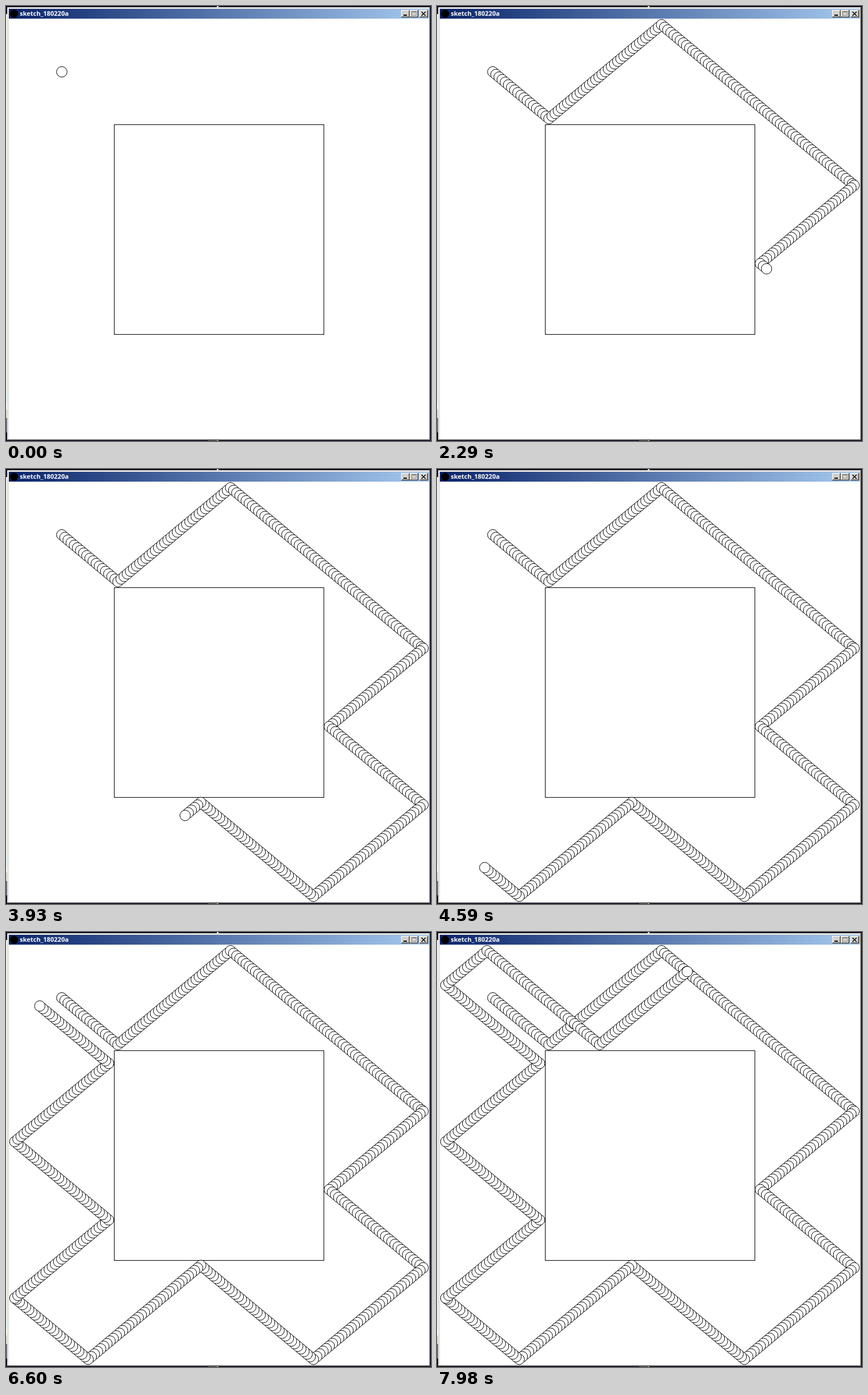
An HTML page with a canvas for the animation above (8000 ms loop, 740 by 757 pixels).

```html
<!DOCTYPE html>
<html lang="en">
<head>
<meta charset="utf-8">
<title>Bouncing ball</title>
<style>
html, body { margin: 0; width: 100%; height: 100%; overflow: hidden; background: #fff; }
canvas { display: block; }
</style>
</head>
<body>
<canvas id="stage" width="740" height="757"></canvas>
<script>
const ctx = document.getElementById('stage').getContext('2d');
const LOOP = 8000, RADIUS = 9.15;
const FACE = '#d4d0c8';

// Limits for the ball's centre, measured from the middle of the field
const MIDDLE = [370.8, 388.1], OUTER = 355.5, INNER = 192.1;
const GAP = OUTER - INNER;
const START = [97.2, 114.6];

// Nearest wall ahead: time in steps and the axis it blocks
function nextHit(pos, vel) {
  let hit = { time: Infinity, axis: 0 };
  for (const axis of [0, 1]) {
    const side = Math.sign(vel[axis]), other = 1 - axis;
    const outer = (side * OUTER - pos[axis]) / vel[axis];
    const inner = (-side * INNER - pos[axis]) / vel[axis];
    const across = Math.abs(pos[other] + vel[other] * inner);
    const time = inner > 0 && across < INNER ? inner : outer;
    if (time < hit.time) hit = { time, axis };
  }
  return hit;
}

// A step that would pass or nearly touch a wall ends on it
function simulate(count) {
  const pos = START.map((p, i) => p - MIDDLE[i]);
  const vel = [GAP / 30, GAP / 36];
  const balls = [START];
  while (balls.length < count) {
    const { time, axis } = nextHit(pos, vel);
    const bounces = time < 1.3;
    const dt = bounces ? time : 1;
    pos[0] += vel[0] * dt;
    pos[1] += vel[1] * dt;
    if (bounces) vel[axis] *= -1;
    balls.push([pos[0] + MIDDLE[0], pos[1] + MIDDLE[1]]);
  }
  return balls;
}

// The sketch slows a little as it runs
const ballCount = t => 1 + Math.floor(0.0652 * t - 2.5e-7 * t * t);
const balls = simulate(ballCount(LOOP));

function box(x, y, w, h, color) {
  ctx.fillStyle = color;
  ctx.fillRect(x, y, w, h);
}

function drawButton(x) {
  box(x, 7, 15, 13, '#404040');
  box(x, 7, 14, 12, '#fff');
  box(x + 1, 8, 13, 11, '#808080');
  box(x + 1, 8, 12, 10, FACE);
}

function drawButtons() {
  [688, 703, 720].forEach(drawButton);
  box(692, 15, 6, 2, '#000');
  // Disabled maximise
  box(707, 10, 9, 8, '#fff');
  box(706, 9, 9, 8, '#808080');
  box(707, 11, 7, 5, FACE);
  for (let i = 0; i < 7; i++) {
    box(723 + i, 10 + i, 2, 1, '#000');
    box(729 - i, 10 + i, 2, 1, '#000');
  }
}

function drawDesktop() {
  box(0, 0, 740, 757, '#080c1c');
  box(0, 14, 3, 658, '#f1f0e8');
  box(0, 672, 3, 18, '#dff6f4');
  box(0, 690, 3, 12, '#fbfbf6');
  box(0, 702, 3, 15, '#dcd9cc');
  box(0, 717, 3, 25, '#6c7280');
  box(367, 0, 3, 2, '#d8d8d8');
  box(352, 756, 15, 1, '#606060');
  box(367, 756, 3, 1, '#d8d8d8');
}

function drawWindow() {
  box(2, 2, 737, 754, '#404040');
  box(2, 2, 736, 753, FACE);
  box(3, 3, 735, 752, '#808080');
  box(3, 3, 734, 751, '#fff');
  box(4, 4, 733, 750, FACE);
  const bar = ctx.createLinearGradient(5, 0, 736, 0);
  bar.addColorStop(0, '#0a246a');
  bar.addColorStop(1, '#a6caf0');
  box(5, 5, 731, 17, bar);
  box(5, 22, 732, 732, '#fff');

  ctx.fillStyle = '#000';
  ctx.beginPath();
  ctx.arc(14, 13.5, 7, 0, Math.PI * 2);
  ctx.fill();
  ctx.fillStyle = '#fff';
  ctx.font = 'bold 11px "Open Sans", "Noto Sans", sans-serif';
  ctx.fillText('sketch_180220a', 24, 17);
  drawButtons();
}

function drawBall([x, y]) {
  ctx.beginPath();
  ctx.arc(x, y, RADIUS, 0, Math.PI * 2);
  ctx.fill();
  ctx.stroke();
}

function draw(t) {
  drawDesktop();
  drawWindow();
  ctx.strokeStyle = '#000';
  ctx.lineWidth = 1;
  ctx.strokeRect(188.5, 206.5, 365, 365);
  ctx.fillStyle = '#fff';
  balls.slice(0, ballCount(t)).forEach(drawBall);
}

const start = performance.now();
function tick() {
  draw((performance.now() - start) % LOOP);
  requestAnimationFrame(tick);
}
tick();
</script>
</body>
</html>
```
